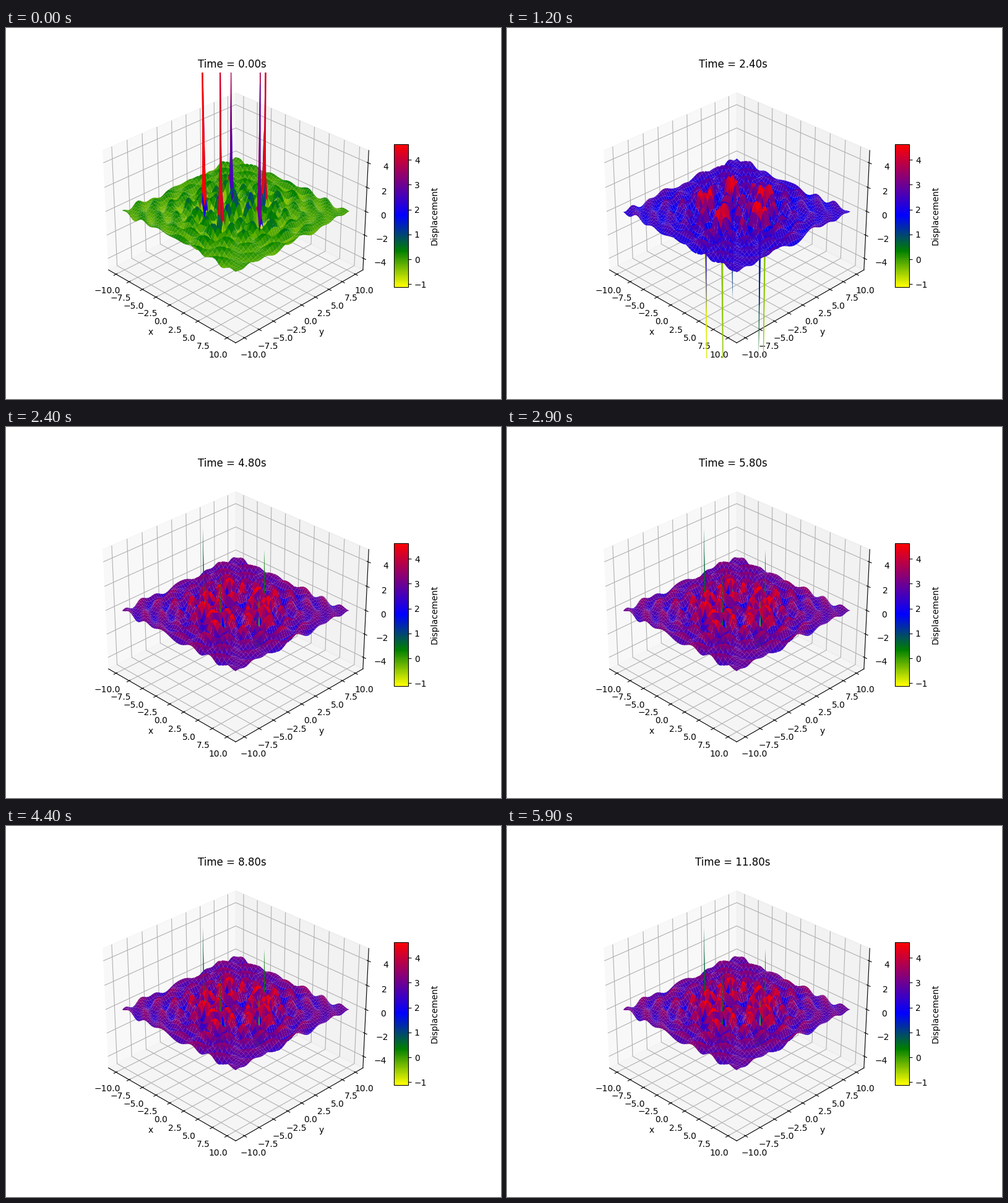
A matplotlib script that plays this animation: 800 px wide and 600 px high, repeating every 6000 ms.

```python
import numpy as np
import matplotlib.pyplot as plt
from matplotlib.animation import FuncAnimation
from matplotlib.colors import LinearSegmentedColormap

FRAMES = 60
INTERVAL = 100          # ms
DT = 0.2                # simulated seconds per frame
STEPS_PER_PERIOD = 5

SOURCES = 5
RADIUS = 4.0
WAVELENGTH = 2.0
FREQUENCY = 1.0

K = 2 * np.pi / WAVELENGTH
OMEGA = 2 * np.pi * FREQUENCY

axis = np.linspace(-10, 10, 200)
X, Y = np.meshgrid(axis, axis)
angles = 2 * np.pi * np.arange(SOURCES) / SOURCES
distances = [np.hypot(X - RADIUS * np.cos(a), Y - RADIUS * np.sin(a))
             for a in angles]


def displacement(t):
    """Sum of the circular waves spreading from all sources."""
    return sum(np.cos(K * r - OMEGA * t) / r for r in distances)


cmap = LinearSegmentedColormap.from_list(
    "waves", ["yellow", "green", "blue", "purple", "red"])

fig = plt.figure(figsize=(8, 6), dpi=100)
ax = fig.add_subplot(111, projection="3d")

# The motion is periodic, so one surface per phase is enough.
surfaces = [ax.plot_surface(X, Y, displacement(i * DT), cmap=cmap)
            for i in range(STEPS_PER_PERIOD)]

ax.set_zlim(-5, 5)
ax.view_init(elev=30, azim=-45)
ax.set_xlabel("x")
ax.set_ylabel("y")
title = ax.set_title("")
fig.colorbar(surfaces[0], ax=ax, shrink=0.5, aspect=10, label="Displacement")


def update(frame):
    for i, surface in enumerate(surfaces):
        surface.set_visible(i == frame % STEPS_PER_PERIOD)
    title.set_text(f"Time = {frame * DT:.2f}s")
    return [*surfaces, title]


anim = FuncAnimation(fig, update, frames=FRAMES, interval=INTERVAL,
                     repeat=True, repeat_delay=0, blit=False)
plt.show()
```
